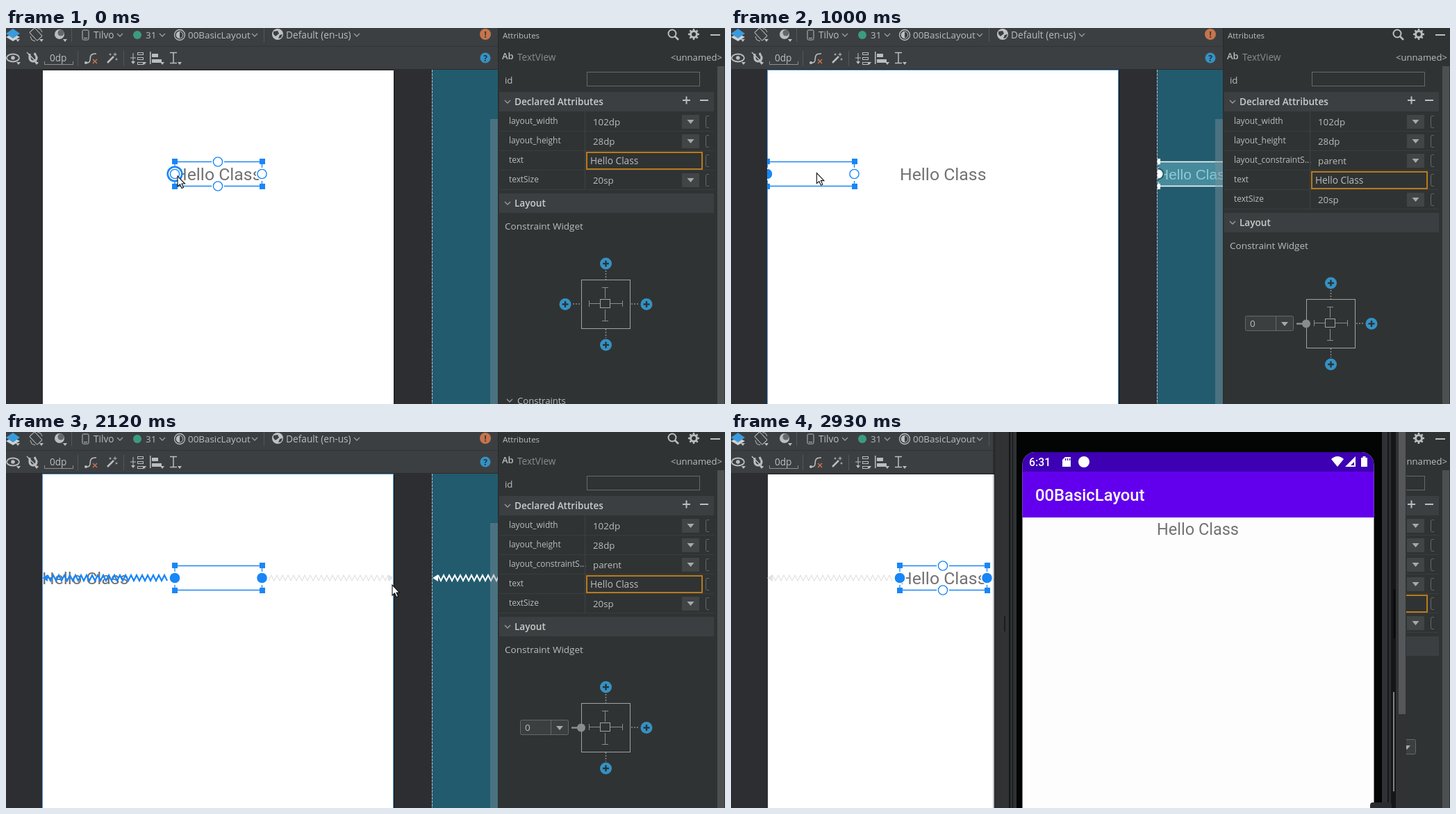
Animation of 1035x541 px, one loop 4070 ms. Source, as an HTML page with a canvas:

```html
<!DOCTYPE html>
<html lang="en">
<head>
<meta charset="utf-8">
<title>Constraint layout editor</title>
<style>
html, body { margin: 0; width: 100%; height: 100%; overflow: hidden; background: #2d2e31; }
canvas { display: block; }
</style>
</head>
<body>
<canvas id="stage" width="1035" height="541"></canvas>
<script>
const ctx = document.getElementById('stage').getContext('2d');
const LOOP = 4070, STEP = 50.5, START = 140;
const BLUE = '#1886f7', LIGHT = '#bbbdbe', BAR = '#3c3f41', PANEL = '#303333', ACCENT = '#3592c4';
const UI = '"Open Sans", sans-serif', ROBOTO = 'Roboto, sans-serif';

// Times of the hard changes, in ms
const at = {
  drag1: 140, snap1: 590, drop1: 690, panel1: 900, render1: 1150, drag2: 1290,
  snap2: 1900, drop2: 2070, panel2: 2200, handles: 2300, render2: 2580, emulator: 2870
};
const cursorPath = [
  [0, 247, 213], [140, 247, 213], [590, 60, 206], [690, 56, 205], [800, 56, 205],
  [1180, 185, 212], [1290, 188, 213], [1370, 188, 213], [1690, 546, 229], [1740, 546, 229],
  [1900, 553, 226], [2090, 556, 220], [2130, 556, 220], [2440, 930, 512], [2500, 930, 512], [2830, 960, 550]
];
const leftGlow = [[2150, 1], [2440, .6], [2500, .6], [2800, 0]];
const rightGlow = [[2130, 0], [2400, 1], [2550, 1], [2800, 0]];

function sample(keys, t) {
  if (t <= keys[0][0]) return keys[0].slice(1);
  for (let i = 1; i < keys.length; i++) {
    const [a, b] = [keys[i - 1], keys[i]];
    if (t < b[0]) return b.slice(1).map((v, k) => a[k + 1] + (v - a[k + 1]) * (t - a[0]) / (b[0] - a[0]));
  }
  return keys[keys.length - 1].slice(1);
}
function rect(x, y, w, h, color) { ctx.fillStyle = color; ctx.fillRect(x, y, w, h); }
function frame(x, y, w, h, color, width = 1) {
  ctx.strokeStyle = color; ctx.lineWidth = width; ctx.strokeRect(x, y, w, h);
}
function round(x, y, w, h, r, fill, stroke) {
  ctx.beginPath(); ctx.roundRect(x, y, w, h, r); paint(fill, stroke);
}
function paint(fill, stroke, width = 1) {
  if (fill) { ctx.fillStyle = fill; ctx.fill(); }
  if (stroke) { ctx.strokeStyle = stroke; ctx.lineWidth = width; ctx.stroke(); }
}
function circle(x, y, r, fill, stroke, width) {
  ctx.beginPath(); ctx.arc(x, y, r, 0, 7); paint(fill, stroke, width);
}
function path(points, color, width = 1, dash = []) {
  ctx.beginPath(); ctx.setLineDash(dash);
  for (let i = 0; i < points.length; i += 2) ctx.lineTo(points[i], points[i + 1]);
  paint(null, color, width); ctx.setLineDash([]);
}
function shape(points, fill, stroke, width) {
  ctx.beginPath();
  for (let i = 0; i < points.length; i += 2) ctx.lineTo(points[i], points[i + 1]);
  ctx.closePath(); paint(fill, stroke, width);
}
function label(text, x, y, size, color = LIGHT, font = UI, weight = 400, align = 'left') {
  ctx.font = `${weight} ${size}px ${font}`; ctx.textAlign = align;
  ctx.fillStyle = color; ctx.fillText(text, x, y);
}
function clipped(x, y, w, h, draw) {
  ctx.save(); ctx.beginPath(); ctx.rect(x, y, w, h); ctx.clip(); draw(); ctx.restore();
}
const chevron = (x, y, s = 4) => path([x - s, y - s / 2, x, y + s / 2, x + s, y - s / 2], '#9a9c9e', 1.3);
const corner = (x, y) => shape([x - 3, y - 2, x + 3, y - 2, x, y + 2], LIGHT);
const dropArrow = (x, y) => shape([x - 5, y - 3, x + 5, y - 3, x, y + 3], '#a7a9aa');
function plus(x, y, s, color, width) {
  path([x - s, y, x + s, y], color, width); path([x, y - s, x, y + s], color, width);
}

function drawToolbar() {
  rect(0, 0, 708, 60, BAR);
  rect(0, 26, 708, 1, '#323436'); rect(0, 59, 708, 1, '#2b2d2e');
  for (const [x, y, h] of [[94, 0, 20], [371, 0, 20], [103, 33, 22], [169, 33, 22]]) rect(x, y, 1, h, '#55585a');

  shape([0, 13, 10, 19, 20, 13, 10, 8], '#d0d2d3');
  shape([0, 8, 10, 1, 20, 8, 10, 15], '#3a9bdc');
  ctx.save(); ctx.translate(43, 9); ctx.rotate(-.75);
  round(-5, -8, 10, 16, 1, null, LIGHT); ctx.restore();
  path([35, 12, 37, 17, 42, 19], LIGHT); path([45, 0, 50, 2, 52, 6], LIGHT);
  circle(77, 9, 7, LIGHT); circle(79, 7, 4.5, '#65686a');
  round(110, 3, 9, 14, 1.5, null, LIGHT); path([112, 14.5, 117, 14.5], LIGHT);
  circle(189, 10, 6, '#3b9b80');
  circle(250, 10, 7.5, null, LIGHT, 1.3);
  circle(250, 10, 4.8, null, LIGHT, 1);
  ctx.beginPath(); ctx.arc(250, 10, 5, Math.PI / 2, Math.PI * 1.5); paint(LIGHT);
  circle(391, 9, 8, '#c0c2c3');
  shape([385, 5, 391, 4, 393, 8, 388, 12, 385, 9], BAR);
  shape([394, 10, 398, 9, 396, 14, 392, 15], BAR);
  label('Tilvo', 126, 15, 13.6);
  label('31', 201, 15, 13.4);
  label('00BasicLayout', 262, 15, 13.4);
  label('Default (en-us)', 403, 15, 13.7);
  for (const x of [164, 225, 358, 505]) chevron(x, 10);
  for (const x of [17, 51, 85]) corner(x, 18);
  circle(690, 9, 8, '#c7744c'); label('!', 690, 14, 13, '#3c3f41', UI, 700, 'center');

  ctx.beginPath(); ctx.ellipse(10, 43, 9, 5.5, 0, 0, 7); paint(null, LIGHT, 1.8);
  circle(10, 43, 2.8, LIGHT);
  ctx.beginPath(); ctx.arc(39, 43, 5, -.6, 3.4); paint(null, LIGHT, 3.2);
  path([43, 40, 41, 36], LIGHT, 3); path([34, 42, 34, 37], LIGHT, 3);
  path([30, 35, 46, 51], LIGHT, 1.5);
  label('0dp', 63, 48, 13.6);
  path([55.5, 48, 55.5, 52.5, 96.5, 52.5, 96.5, 48], '#8d9092');
  ctx.beginPath(); ctx.moveTo(114, 50);
  ctx.bezierCurveTo(128, 52, 114, 36, 130, 37); paint(null, LIGHT, 1.6);
  circle(115, 50, 2, LIGHT);
  path([125, 45, 131, 51], '#c7744c', 1.5); path([131, 45, 125, 51], '#c7744c', 1.5);
  path([146, 50, 155, 41], LIGHT, 2.5);
  plus(157, 38, 2.5, LIGHT, 1); plus(150, 38, 1.5, LIGHT, 1); plus(159, 45, 1.5, LIGHT, 1);
  path([183, 36, 183, 51], LIGHT); corner(183, 50);
  path([179, 43, 187, 43], LIGHT);
  for (const y of [35, 42, 49]) frame(189.5, y + .5, 8, 3, LIGHT);
  rect(207, 34, 1.5, 18, LIGHT); rect(210, 37, 9, 5, LIGHT); rect(210, 45, 14, 5, LIGHT);
  path([236, 35.5, 246, 35.5], LIGHT, 1.5); path([236, 50.5, 246, 50.5], LIGHT, 1.5);
  path([241, 36, 241, 50], LIGHT, 1.5);
  for (const x of [18, 44, 199, 225, 250]) corner(x, 51);
  circle(690, 43, 7.5, ACCENT); label('?', 690, 48, 12, '#263238', UI, 700, 'center');
}

function sectionHeader(y, title) {
  rect(710, y, 309, 28, BAR);
  chevron(722, y + 14); label(title, 732, y + 19, 13.6, '#c9cbcc', UI, 600);
}
function marginBox(x, y) {
  round(x + .5, y - 10.5, 69, 21, 2, '#3b3f40', '#66696a');
  rect(x + 44, y - 10, 1, 20, '#66696a');
  label('0', x + 7, y + 5, 13.5); dropArrow(x + 57, y + 1);
}
function drawConstraintWidget(y, left, right) {
  const grey = '#8a8c8d';
  const addButton = (x, by) => { circle(x, by, 8.5, ACCENT); plus(x, by, 4.5, '#28343a', 2.4); };
  path([863.5, y - 48, 863.5, y - 35], grey, 1.5, [2, 2]); path([863.5, y + 36, 863.5, y + 49], grey, 1.5, [2, 2]);
  frame(828.5, y - 34.5, 70, 70, '#a0a2a3');
  frame(855.5, y - 6.5, 14, 12, '#a0a2a3');
  path([839, y - .5, 855, y - .5], grey); path([870, y - .5, 888, y - .5], grey);
  path([839.5, y - 5, 839.5, y + 4], grey); path([887.5, y - 5, 887.5, y + 4], grey);
  for (const s of [-1, 1]) {
    path([862.5, y + s * 8, 862.5, y + s * 24], grey);
    path([858, y + s * 24 + .5, 867, y + s * 24 + .5], grey);
  }
  addButton(863.5, y - 58); addButton(863.5, y + 59);
  if (left) {
    marginBox(740, y); path([814, y + .5, 828, y + .5], grey, 2.5); circle(828, y + .5, 6, grey);
  } else {
    addButton(805, y + .5); path([816, y, 829, y], grey, 1.5, [2, 2]);
  }
  if (right) {
    marginBox(916, y); path([899, y + .5, 913, y + .5], grey, 2.5); circle(899, y + .5, 6, grey);
    round(803, y + 87, 120, 4, 2, '#232525');
    circle(863, y + 89, 10.5, '#4b4e4f', '#797b7c', 1.3);
    label('50', 863, y + 94, 12, '#7b7d7e', UI, 400, 'center');
  } else {
    addButton(922, y + .5); path([900, y, 911, y], grey, 1.5, [2, 2]);
  }
}

function drawPanel(t) {
  rect(708, 0, 327, 541, PANEL); rect(708, 0, 1, 541, '#292b2c');
  label('Attributes', 715, 15, 11.5);
  circle(959, 8, 5.5, null, LIGHT, 2); path([963, 12, 968, 17], LIGHT, 2.5);
  circle(990, 9, 4.5, null, LIGHT, 3);
  for (let a = 0; a < 8; a++) {
    const c = Math.cos(a * Math.PI / 4), s = Math.sin(a * Math.PI / 4);
    path([990 + 5 * c, 9 + 5 * s, 990 + 8 * c, 9 + 8 * s], LIGHT, 2.5);
  }
  rect(1014, 9, 14, 2, LIGHT);
  label('Ab', 714, 45, 13, LIGHT, UI, 600); label('TextView', 736, 47, 13.6, '#8a8c8d');
  label('<unnamed>', 957, 47, 13.1);
  label('id', 718, 80, 13.3); frame(836.5, 63.5, 162, 20, '#66696a');
  rect(1024, 55, 10, 486, '#4d5051');

  sectionHeader(92, 'Declared Attributes');
  plus(979.5, 104, 5.5, LIGHT, 2); rect(999, 103, 12, 2, LIGHT);
  const rows = [['layout_width', '102dp'], ['layout_height', '28dp']];
  if (t >= at.render2) rows.push(['layout_constraintE...', 'parent']);
  if (t >= at.panel1) rows.push(['layout_constraintS...', 'parent']);
  rows.push(['text', 'Hello Class'], ['textSize', '20sp']);
  rows.forEach(([name, value], i) => {
    const y = 134 + 28 * i;
    rect(710, y + 14, 309, 1, '#3a3d3e');
    label(name, 724, y + 4, 11.9);
    round(1007.5, y - 7.5, 12, 17, 2, null, '#66696a'); rect(1012, y - 9, 9, 20, PANEL);
    if (name === 'text') {
      frame(836, y - 11, 166, 24, '#b87a1d', 2);
      label(value, 841, y + 6, 13.7);
    } else {
      label(value, 845, y + 6, 13.3);
      rect(973, y - 9, 25, 20, '#414546'); dropArrow(985.5, y + 1);
    }
  });
  const bottom = 120 + 28 * rows.length;
  rect(833, 120, 1, bottom - 120, '#3f4243');
  sectionHeader(bottom + 6, 'Layout');
  label('Constraint Widget', 718, bottom + 58, 13.5);
  drawConstraintWidget(bottom + 165, t >= at.panel1, t >= at.panel2);
  if (t < at.panel1) { chevron(725, 536); label('Constraints', 736, 541, 13.1); }
}

// A spring with an arrowhead at `tip`, ending at `end`
function spring(tip, end, color, width) {
  const dir = Math.sign(end - tip), points = [];
  for (let x = 8, i = 0; x <= Math.abs(end - tip); x += 4, i++) points.push(tip + dir * x, 210 + (i % 2 ? 4 : -4));
  path(points, color, width);
  shape([tip, 210, tip + dir * 8, 205, tip + dir * 8, 215], color);
}
function glowingSpring(tip, end, glow) {
  spring(tip, end, '#e2e2e2', 1.2);
  ctx.globalAlpha = glow; spring(tip, end, BLUE, 1 + 1.2 * glow); ctx.globalAlpha = 1;
}

function drawSelection(t, x) {
  const right = x + 125.5, mid = x + 62;
  path([x, 192.5, right, 192.5], BLUE, 1.3); path([x, 227.5, right, 227.5], BLUE, 1.3);
  const anchor = (cx, cy, filled, hover) => {
    circle(cx, cy, 9, '#fff');
    if (hover) circle(cx, cy, 10.3, '#fff', BLUE, 2.6);
    circle(cx, cy, 6.6, filled ? BLUE : '#fff', BLUE, 1.4);
  };
  for (const side of [x, right]) {
    path([side, 196, side, 224], BLUE, 1.3, [5, 3]);
    for (const y of [192, 228]) rect(Math.round(side) - 4, y - 4, 8, 8, BLUE);
  }
  anchor(x, 210, t >= at.drag1, t < at.drag1);
  anchor(right, 210, t >= at.drag2, t >= 1200 && t < at.drag2);
  if (t < at.drag1 || t >= at.handles) {
    for (const y of [192.5, 227.5]) anchor(mid, y, false);
  }
}

function drawBlueprint(t) {
  rect(614, 60, 94, 481, '#225b6e');
  const docked = t >= at.snap1 && t < at.snap2;
  clipped(614, 60, 94, 481, () => {
    if (docked) {
      rect(615, 192, 93, 36, '#468a9b');
      label('Hello Class', 615, 218, 21, '#8fcad8', '"Liberation Sans", Arial, sans-serif');
      path([615, 192.5, 708, 192.5], '#fff', 1.4); path([615, 227.5, 708, 227.5], '#fff', 1.4);
      path([615.5, 193, 615.5, 228], '#fff', 1, [4, 3]);
      for (const y of [192, 228]) rect(612, y - 4, 6, 8, '#fff');
      circle(615, 210, 8.5, '#225b6e'); circle(615, 210, 6.5, '#fff');
    } else if (t >= at.snap2) {
      const [glow] = sample(leftGlow, t);
      spring(614, 712, glow > .9 ? '#fff' : '#bdd3da', 1 + glow);
    }
    if (t >= at.panel2 && t < at.render2) {
      for (let i = 0; i < 8; i++) {
        const a = i * Math.PI / 4, c = Math.cos(a), s = Math.sin(a);
        const shade = .25 + .6 * ((i + 8 - Math.floor(t / 100) % 8) % 8) / 8;
        path([697 + 4 * c, 71 + 4 * s, 697 + 8 * c, 71 + 8 * s], `rgba(165,175,180,${shade})`, 1.8);
      }
    }
    rect(697, 131, 11, 410, 'rgba(130,145,155,.42)');
  });
  path([613.5, 60, 613.5, 541], '#9fc3d6', 1, [4, 1]);
}

function drawCanvas(t, cx, cy) {
  rect(0, 60, 708, 481, '#2d2e31');
  drawBlueprint(t);
  rect(558, 62, 2, 479, '#232426');
  rect(53, 61, 505, 480, '#fff');
  if (t >= at.drag1 && t < at.panel2) frame(52.5, 60.5, 505, 490, '#5294d8');
  const boxX = t >= at.snap1 && t < at.snap2 ? 52 : 243;
  const textX = t >= at.render1 && t < at.render2 ? 52 : 243;
  clipped(52, 61, 506, 480, () => {
    label('Hello Class', textX, 219, 24.8, '#727272', ROBOTO);
    if (t >= at.snap2) {
      glowingSpring(52, 235, sample(leftGlow, t)[0]);
      glowingSpring(558, 377, sample(rightGlow, t)[0]);
    }
    drawSelection(t, boxX);
    const from = t >= at.drag1 && t < at.snap1 ? 243 : t >= at.drag2 && t < at.snap2 ? 177.5 : 0;
    if (from) {
      path([from, 210, cx, cy], BLUE, 1.3);
      ctx.save(); ctx.translate(cx, cy); ctx.rotate(Math.atan2(cy - 210, cx - from));
      shape([0, 0, -9, -5, -9, 5], BLUE); ctx.restore();
    }
  });
}

function drawCursor(t, x, y) {
  const pressed = t >= at.drag1 && t < at.drop1 || t >= at.drag2 && t < at.drop2;
  if (pressed) circle(x - .5, y, 14, 'rgba(253,245,55,.72)');
  shape([x, y, x, y + 15, x + 3.5, y + 12, x + 6, y + 17.5, x + 8.5, y + 16.5, x + 6, y + 11, x + 10.5, y + 11],
    '#fff', '#111', 1.1);
}

function drawEmulator() {
  rect(377, 0, 2, 541, 'rgba(0,0,0,.25)');
  rect(379, 0, 593, 541, '#303234');
  rect(379, 0, 1, 541, '#202122');
  rect(393, 265, 2, 22, '#1b1c1d');
  rect(400, 0, 557, 541, '#141617');
  rect(402, 0, 3, 541, '#2c2f30'); rect(406, 0, 5, 541, '#2f3234');
  rect(411, 0, 526, 541, '#030404');
  rect(937, 0, 8, 541, '#2f3234'); rect(947, 0, 3, 541, '#2c2f30');
  rect(953, 226, 4, 71, '#0c0d0e'); rect(953, 374, 2, 143, '#808284');
  rect(961, 0, 10, 406, '#55585a');
  ctx.save();
  ctx.beginPath(); ctx.roundRect(419.5, 29, 506, 560, 18); ctx.clip();
  rect(419, 29, 507, 512, '#fdfdfd');
  rect(419, 29, 507, 28, '#3d00b3'); rect(419, 57, 507, 66, '#6200ee');
  ctx.restore();
  label('6:31', 429, 49, 15.8, '#fff', ROBOTO, 500);
  shape([481, 36, 489, 36, 489, 50, 477, 50, 477, 40], '#fff');
  for (const x of [481, 484, 487]) rect(x, 38, 1.3, 3, '#3d00b3');
  circle(508, 43, 8, '#fff');
  ctx.beginPath(); ctx.moveTo(873, 50); ctx.lineTo(864, 39);
  ctx.quadraticCurveTo(873, 31, 882, 39); ctx.closePath(); paint('#fff');
  shape([899, 35, 899, 50, 884, 50], '#fff'); shape([897, 43, 897, 48, 892, 48], '#3d00b3');
  rect(907, 37, 9, 13, '#fff'); rect(909.5, 35, 4, 2, '#fff');
  label('00BasicLayout', 438, 99, 23.8, '#fff', ROBOTO, 500);
  label('Hello Class', 613, 148, 23.5, '#727272', ROBOTO);
  round(920, 533, 31, 14, 4, '#2a2c2e');
}

function render(time) {
  const now = time % LOOP;
  const t = now < START ? 0 : START + Math.floor((now - START) / STEP) * STEP;
  const [x, y] = sample(cursorPath, t);
  drawCanvas(t, x, y);
  drawToolbar();
  drawPanel(t);
  if (t >= at.emulator) drawEmulator();
  else drawCursor(t, x, y);
}

const begin = performance.now();
function tick() {
  render(performance.now() - begin);
  requestAnimationFrame(tick);
}
tick();
</script>
</body>
</html>
```
